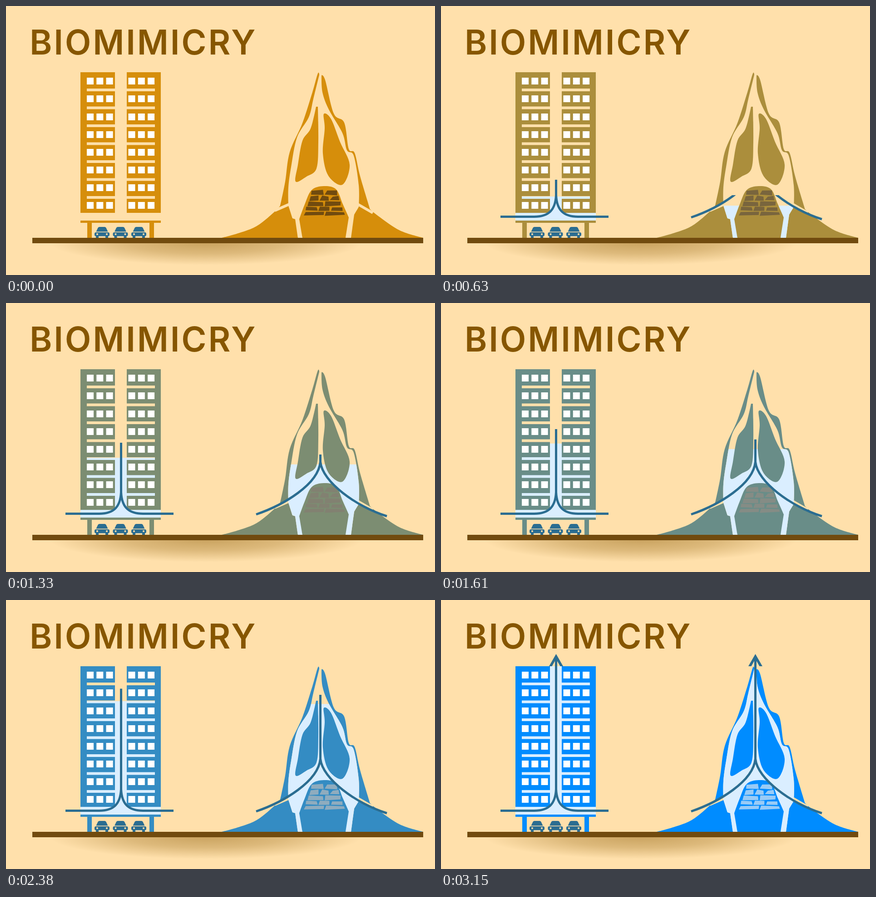
An HTML page that plays this animation: 945 px wide and 593 px high, repeating every 3.82 s.

```html
<!DOCTYPE html>
<html lang="en">
<head>
<meta charset="utf-8">
<title>Biomimicry</title>
<style>
html, body { margin: 0; width: 100%; height: 100%; overflow: hidden; background: #ffe0ab; }
svg { display: block; }
text { font: 600 75px Inter, Lato, sans-serif; letter-spacing: 3.8px; fill: #865600; }
.main { fill: var(--main); }
.water { fill: #daeeff; }
.air { fill: none; stroke: #2b6d91; stroke-width: 5; }
.head, .car { fill: #2b6d91; stroke: none; }
.gap { fill: #ffe0ab; }
.vent { stroke: #ffe0ab; stroke-width: 6; }
#stones { fill: var(--stone); }
</style>
</head>
<body>
<svg id="stage" width="945" height="593" viewBox="0 0 945 593">
  <defs>
    <radialGradient id="shade" gradientUnits="userSpaceOnUse" r="1"
      cx="0" cy="0" gradientTransform="translate(440 521) scale(345 50)">
      <stop offset="0" stop-color="#865600" stop-opacity=".45"/>
      <stop offset=".5" stop-color="#865600" stop-opacity=".28"/>
      <stop offset="1" stop-color="#865600" stop-opacity="0"/>
    </radialGradient>
    <clipPath id="inside"><path class="cavity"/></clipPath>
    <clipPath id="towerWipe"><rect id="towerCut" x="100" width="300" height="600"/></clipPath>
    <clipPath id="moundWipe"><rect id="moundCut" x="500" width="400" height="600"/></clipPath>
    <path id="head" class="head" d="M0 119L15.5 146H9L0 130L-9 146H-15.5Z"/>
    <g id="car">
      <path class="car" d="M3.500 497.500L7.500 489Q8.500 487 11 487H22Q24.500 487 25.500 489L29.500 497.500Z"/>
      <rect class="car" y="499" width="33" height="8.500" rx="3"/>
      <path class="car" d="M3 506h6v5h-6zM24 506h6v5h-6z"/>
      <circle class="gap" cx="6" cy="503" r="2"/>
      <circle class="gap" cx="27" cy="503" r="2"/>
    </g>
  </defs>

  <text x="52" y="107">BIOMIMICRY</text>
  <rect x="90" y="523" width="700" height="50" fill="url(#shade)"/>

  <rect id="towerWater" class="water" x="164" width="177"/>
  <path id="tower" class="main" fill-rule="evenodd"/>
  <path id="panes" fill="#fff"/>
  <path class="main" d="M164 473H341V478H326V511H316V478H189V511H179V478H164Z"/>
  <use href="#car" x="195"/><use href="#car" x="235.500"/><use href="#car" x="276"/>

  <path id="hill" class="main"/>
  <path class="vent" d="M592 451L624 437M775 437L808 456"/>
  <path class="cavity gap"/>
  <rect id="moundWater" class="water" x="600" width="200" clip-path="url(#inside)"/>
  <path id="leftLobe" class="main"/>
  <path id="rightLobe" class="main"/>
  <path id="chamber" class="main"/>
  <path id="stones"/>

  <rect x="58" y="511" width="861" height="12" fill="#714b0f"/>
  <g class="air" clip-path="url(#towerWipe)">
    <path d="M131 464.500H205C238 464.500 252 449 253.500 417V123M369 464.500H302C269 464.500 255 449 253.500 417"/>
    <use href="#head" x="253.500"/>
  </g>
  <g class="air" clip-path="url(#moundWipe)">
    <path d="M551 466C612 445 688 400 692.500 350V123M839 470C772 449 697 395 692.500 350"/>
    <use href="#head" x="692.500"/>
  </g>
</svg>
<script>
const $ = id => document.getElementById(id);
const box = (x, y, w, h) => `M${x} ${y}h${w}v${h}h${-w}z`;
const shape = (id, d) => $(id).setAttribute('d', d);

// Closed smooth outline through "x,y" points; a trailing ! makes a sharp corner.
function outline(list) {
  const pts = list.trim().split(/\s+/).map(s => {
    const [x, y] = s.split(',').map(parseFloat);
    return { x, y, sharp: s.endsWith('!') };
  });
  const at = i => pts[(i + pts.length) % pts.length];
  const handle = (i, dir) => {
    const p = at(i), k = p.sharp ? 0 : dir / 6;
    return `${p.x + (at(i + 1).x - at(i - 1).x) * k} ${p.y + (at(i + 1).y - at(i - 1).y) * k}`;
  };
  return `M${pts[0].x} ${pts[0].y}` + pts.map((p, i) =>
    `C${handle(i, 1)} ${handle(i + 1, -1)} ${at(i + 1).x} ${at(i + 1).y}`).join('') + 'Z';
}

// Tower: two wings with floor slots and windows.
let walls = box(164, 146, 76, 310) + box(266, 146, 75, 310), panes = '';
for (let row = 0; row < 8; row++) {
  const slot = 182 + row * 39.5;
  if (row < 7) walls += box(178, slot, 62, 6) + box(266, slot, 62, 6);
  for (const wing of [178, 269.5])
    for (let col = 0; col < 3; col++)
      panes += box(wing + col * 21.3, Math.round(158.3 + row * 39.15), 15, 15);
}
shape('tower', walls);
shape('panes', panes);

// Mound: a solid hill, its cavity, and the masses standing inside.
shape('hill', outline(`475,511! 545,489 590,455 604,440! 615,387 625,322 653,258 675,190 688,147
  692,170! 695,153! 703,163 722,237 745,257 755,315 768,324 780,375 802,448! 820,463 868,495 919,511!`));
const cavity = outline(`691,148! 677,205 667,245 641,290 628,355 622,400 622,440! 631,468! 637,470!
  643,511! 760,511! 767,460! 777,443! 777,395 766,330 751,318 741,280 711,228 697,190 695,153!`);
document.querySelectorAll('.cavity').forEach(p => p.setAttribute('d', cavity));
shape('leftLobe', outline('683,222! 671,270 653,297 643,350 638,387 662,376 684,358 688,300 687,222!'));
shape('rightLobe', outline('700,238 716,249 736,300 757,350 741,394 710,374 698,325 702,270'));
shape('chamber', outline('653,511! 646,470! 657,440 673,406 700,397 727,404 742,437 755,466! 748,511!'));

// Stones: widening courses, each split into slightly crooked blocks.
let seed = 7, stones = '';
const jitter = size => ((seed = seed * 16807 % 2147483647) / 2147483647 - .5) * size;
for (let row = 0, y = 406; row < 5; row++) {
  const height = 10.5 - row * .7, half = 30 + row * 4, count = 2 + row % 2;
  const wide = 2 * half / count;
  for (let i = 0; i < count; i++) {
    const x = 702 - half + i * wide, end = x + wide - 3;
    stones += `M${x + 4 + jitter(6)} ${y + jitter(3)}L${end + jitter(4)} ${y + jitter(3)}` +
      `L${end + jitter(4)} ${y + height + jitter(3)}L${x} ${y + height + jitter(3)}Z`;
  }
  y += height + 2.5;
}
shape('stones', stones);

const mix = (a, b, k) => `rgb(${a.map((v, i) => Math.round(v + (b[i] - v) * k))})`;
function fill(id, top, bottom) {
  $(id).setAttribute('y', top);
  $(id).setAttribute('height', Math.max(0, bottom - top));
}

function draw(now) {
  const step = Math.min(45, Math.floor(now % 3820 / 70));
  const k = step / 45, style = $('stage').style;
  style.setProperty('--main', mix([214, 142, 11], [0, 140, 255], k));
  style.setProperty('--stone', mix([113, 75, 15], [153, 203, 246], k));
  fill('towerWater', Math.max(146, 491 - 7.88 * step), 473);
  fill('moundWater', 516 - 8.43 * step, 511);
  $('towerCut').setAttribute('y', step ? 450.5 - 7.5 * step : 600);
  $('moundCut').setAttribute('y', 492 - 8.32 * step);
}

const start = performance.now();
function tick() {
  draw(performance.now() - start);
  requestAnimationFrame(tick);
}
tick();
</script>
</body>
</html>
```
